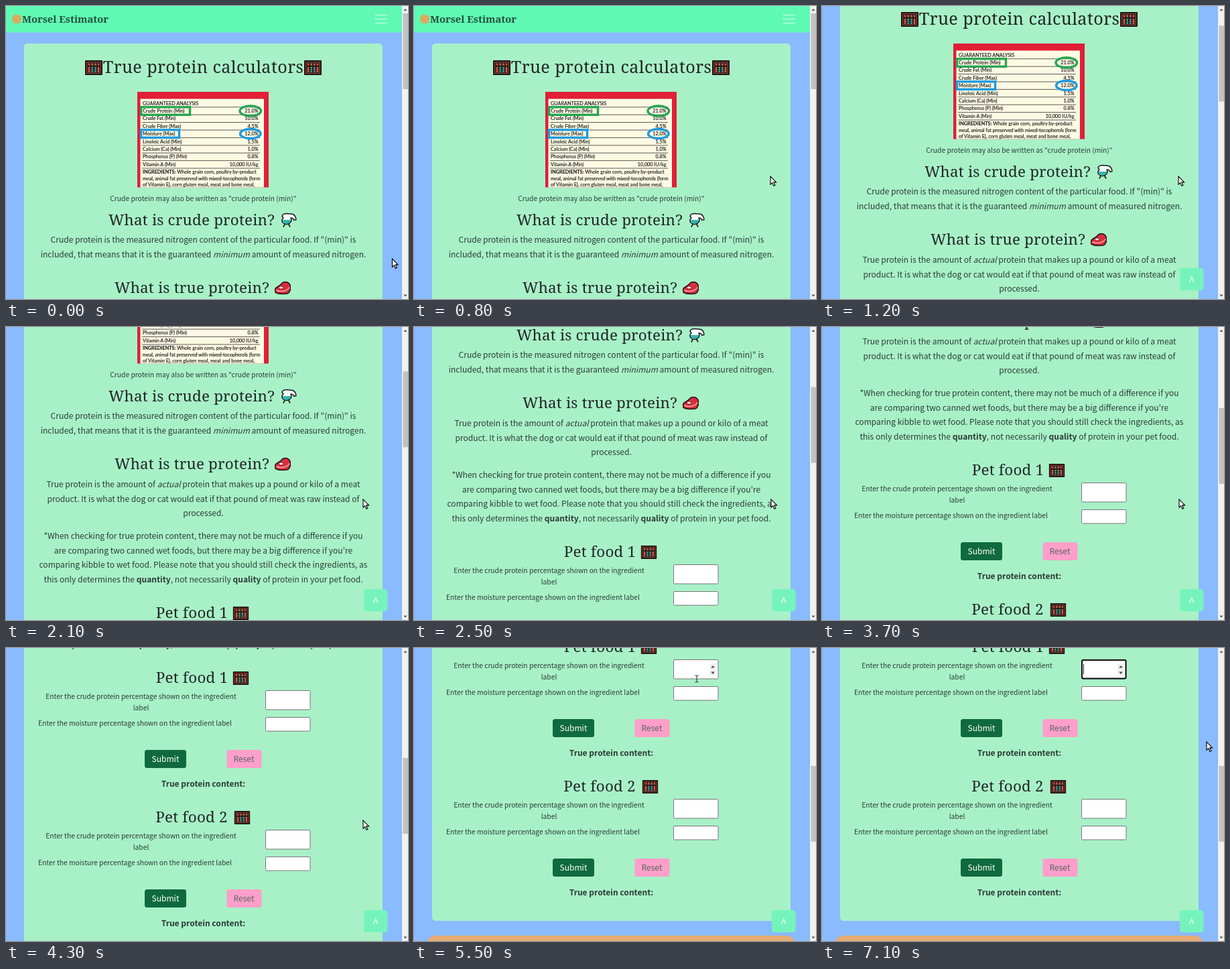
An HTML page that plays this animation: 600x437 px, repeating every 7200 ms.

```html
<!DOCTYPE html>
<html lang="en">
<head>
<meta charset="utf-8">
<title>True protein calculators</title>
<style>
  html, body { margin: 0; width: 100%; height: 100%; overflow: hidden; background: #8abaff; }
  svg { display: block; width: 100%; height: 100%; }
  text { font-family: "Noto Sans CJK JP", "Noto Sans CJK SC", "Noto Sans CJK", "Open Sans", sans-serif; font-size: 12.06px; fill: #2b3b36; text-anchor: middle; }
  .head { font-family: "Noto Serif", serif; font-size: 22.4px; letter-spacing: .2px; fill: #212529; }
  .title { font-size: 25.2px; letter-spacing: .4px; }
  .brand { font-family: "Noto Serif", serif; font-size: 14.7px; font-weight: 600; fill: #23503f; text-anchor: start; }
  .small { font-size: 10.25px; }
  .strong { font-weight: 700; }
  .slant { font-style: italic; }
  .pack text { font-family: Lato, sans-serif; font-size: 7.25px; font-weight: 500; fill: #1d1d1b; stroke: #1d1d1b; stroke-width: .12px; text-anchor: start; }
  .pack .right { text-anchor: end; }
  .pack .mark { fill: none; stroke-width: 3.4; }
  .pack .rule { stroke: #333; stroke-width: .8; }
  .field { fill: #fff; stroke: #767676; }
</style>
</head>
<body>
<svg viewBox="0 0 600 437">
  <defs>
    <symbol id="abacus" viewBox="0 0 26 22">
      <rect width="26" height="22" rx="1" fill="#171414"/>
      <rect x="2.500" y="2.500" width="21" height="17" fill="#2a1f1e" stroke="#a8412f"/>
      <g fill="none" stroke-width="2.500">
        <path d="M6 4.500v3M6 10v8M20 4.500v3M20 10v8" stroke="#e5503f"/>
        <path d="M10.700 4.500v3M15.400 4.500v3" stroke="#c9704a"/>
        <path d="M10.700 10v8M15.400 10v8" stroke="#3fa9a0" stroke-dasharray="2.200 .8"/>
      </g>
    </symbol>
    <symbol id="flask" viewBox="0 0 24 22">
      <path d="M4 21L6.500 16M14 21L11.500 16" stroke="#222" stroke-width="1.800"/>
      <path d="M2 5Q3 1 9 1L18 2Q22.500 4 23 10L20 11Q18.500 7.500 15 7.500 17.500 12 13 15.500 8 18.500 3.500 15 0 11 4 7.500z" fill="#f8fcfb" stroke="#1b1b1b" stroke-width="1.500" stroke-linejoin="round"/>
      <path d="M2.800 10.500H15Q15 14 12 15.300 8 17.300 4.500 14.800 2.600 13 2.800 10.500z" fill="#35b5b2"/>
    </symbol>
    <symbol id="steak" viewBox="0 0 24 20">
      <path d="M1 11.500C2 8 7 8 10 4S19 0 22 4 23.500 14 21 17 5 19 2 17 .5 13.500 1 11.500z" fill="#db2f3e" stroke="#2a1617" stroke-width="1.700"/>
      <path d="M2.500 13.500Q8 16 14 14.500T22 9" fill="none" stroke="#f6a9a6" stroke-width="1.500"/>
      <ellipse cx="9.500" cy="9.500" rx="3.200" ry="2" fill="#fff" stroke="#7a1b23"/>
    </symbol>
    <g id="form">
      <text class="small" x="201.500" y="673.500">Enter the crude protein percentage shown on the ingredient</text>
      <text class="small" x="201.500" y="691">label</text>
      <text class="small" x="192.500" y="713.500">Enter the moisture percentage shown on the ingredient label</text>
      <rect class="field" x="387.500" y="661.500" width="66.500" height="28.500" rx="1.500"/>
      <rect class="field" x="387.500" y="701.500" width="66.500" height="20.500" rx="1.500"/>
      <rect x="207" y="750" width="62" height="27" rx="3.500" fill="#0f6a3f"/>
      <text x="238" y="768" style="fill:#fff">Submit</text>
      <rect x="329.500" y="750" width="52" height="27" rx="3.500" fill="#fd9fc9"/>
      <text x="355" y="768" style="fill:#50665f">Reset</text>
      <text class="strong" x="294.500" y="804.500">True protein content:</text>
    </g>
    <clipPath id="packClip"><rect x="196" y="128" width="196" height="142.500"/></clipPath>
  </defs>

  <rect width="600" height="437" fill="#8abaff"/>
  <g id="page">
    <rect width="591" height="39.500" fill="#60f9b3"/>
    <circle cx="16" cy="19.500" r="7" fill="#dcab62"/>
    <text class="brand" x="24" y="24.500">Morsel Estimator</text>
    <path d="M551 13.500h18M551 19.500h18M551 25.500h18" stroke="#b5fcdc" stroke-width="1.500"/>

    <rect x="27" y="56" width="535" height="995" rx="5" fill="#a8f1c7"/>
    <use href="#abacus" x="118" y="81" width="26" height="22"/>
    <text class="head title" x="294.500" y="100">True protein calculators</text>
    <use href="#abacus" x="445" y="81" width="26" height="22"/>

    <g class="pack" clip-path="url(#packClip)">
      <rect x="196" y="128" width="196" height="143" fill="#e01f35"/>
      <rect x="200.500" y="138.500" width="184.500" height="140" fill="#fdfae4"/>
      <text class="strong" x="204" y="147.500">GUARANTEED ANALYSIS</text>
      <g id="rows"></g>
      <text x="204" y="250"><tspan class="strong">INGREDIENTS:</tspan> Whole grain corn, poultry by-product</text>
      <text x="204" y="259.800" style="letter-spacing:-.08px">meal, animal fat preserved with mixed-tocopherols (form</text>
      <text x="204" y="269.300">of Vitamin E), corn gluten meal, meat and bone meal,</text>
      <g class="mark" stroke="#26a551">
        <rect x="201.500" y="150.800" width="73" height="11.500"/>
        <ellipse cx="364.800" cy="156.500" rx="15.800" ry="7.500"/>
      </g>
      <g class="mark" stroke="#1e9be0">
        <rect x="201.500" y="184.800" width="57" height="11.500"/>
        <ellipse cx="364.800" cy="190.500" rx="15.300" ry="7"/>
      </g>
    </g>
    <text class="small" x="294.500" y="290.500">Crude protein may also be written as "crude protein (min)"</text>

    <text class="head" x="277" y="327">What is crude protein?</text>
    <use href="#flask" x="410" y="308.500" width="24" height="22"/>
    <text x="294.500" y="353">Crude protein is the measured nitrogen content of the particular food. If "(min)" is</text>
    <text x="294.500" y="374.500">included, that means that it is the guaranteed <tspan class="slant">minimum</tspan> amount of measured nitrogen.</text>

    <text class="head" x="277.500" y="428">What is true protein?</text>
    <use href="#steak" x="401" y="410.500" width="24" height="20"/>
    <text x="294.500" y="455">True protein is the amount of <tspan class="slant">actual</tspan> protein that makes up a pound or kilo of a meat</text>
    <text x="294.500" y="476.500">product. It is what the dog or cat would eat if that pound of meat was raw instead of</text>
    <text x="294.500" y="498">processed.</text>
    <text x="294.500" y="532">*When checking for true protein content, there may not be much of a difference if you</text>
    <text x="294.500" y="553.500">are comparing two canned wet foods, but there may be a big difference if you're</text>
    <text x="294.500" y="575">comparing kibble to wet food. Please note that you should still check the ingredients, as</text>
    <text x="294.500" y="596.500">this only determines the <tspan class="strong">quantity</tspan>, not necessarily <tspan class="strong">quality</tspan> of protein in your pet food.</text>

    <text class="head" x="277.500" y="650">Pet food 1</text>
    <use href="#abacus" x="338.500" y="633" width="24" height="20"/>
    <use href="#form"/>
    <text class="head" x="277" y="858">Pet food 2</text>
    <use href="#abacus" x="340.500" y="841" width="24" height="20"/>
    <use href="#form" y="208"/>

    <g id="spinner">
      <rect x="441" y="667" width="10" height="18" fill="#f0f0f0"/>
      <path d="M443.200 673.500h5.600l-2.800-3.500zM443.200 679.500h5.600l-2.800 3.500z" fill="#505050"/>
    </g>
    <rect id="ring" x="388" y="662" width="65.500" height="27.500" rx="2" fill="none" stroke="#101010" stroke-width="2"/>
    <path id="caret" d="M390.500 668v15" stroke="#222"/>
    <rect x="19" y="1073" width="550" height="200" rx="13" fill="#e7ab72"/>
  </g>

  <g id="toTop">
    <rect x="534" y="391" width="35.500" height="33" rx="4" fill="#76f3bd"/>
    <path d="M548.700 411.500l3-7.500 3 7.500" fill="none" stroke="#d2fbe8" stroke-width="1.700"/>
  </g>

  <rect x="591" width="9" height="437" fill="#f1f1f1"/>
  <rect id="thumb" x="592.500" width="7.500" height="113" fill="#c1c1c1"/>
  <path d="M593.500 7h5l-2.500-3zM593.500 430.500h5l-2.500 3z" fill="#505050"/>

  <g id="pointer">
    <path id="arrow" d="M0 0v12.200l2.800-2.600 2.100 4.700 2-.9-2.100-4.500h3.800z" fill="#fff" stroke="#000" stroke-width="1.100"/>
    <path id="beam" d="M-2.500-5Q0-5 0-4 0-5 2.500-5M0-4.500v9M-2.500 5Q0 5 0 4 0 5 2.500 5" fill="none" stroke="#222"/>
  </g>
</svg>
<script>
  const $ = id => document.getElementById(id);
  const LOOP = 7200, STEP = 100;

  const nutrients = [
    ["Crude Protein (Min)", "21.0%"], ["Crude Fat (Min)", "10.0%"],
    ["Crude Fiber (Max)", "4.5%"], ["Moisture (Max)", "12.0%"],
    ["Linoleic Acid (Min)", "1.5%"], ["Calcium (Ca) (Min)", "1.0%"],
    ["Phosphorus (P) (Min)", "0.8%"], ["Vitamin A (Min)", "10,000 IU/kg"]
  ];
  const rule = y => `<path class="rule" d="M203 ${y}H379"/>`;
  $("rows").innerHTML = nutrients.map(([name, amount], i) => {
    const y = 159 + i * 11.4;
    return `${rule(y - 8.2)}<text x="204" y="${y}">${name}</text>
      <text class="right" x="376.500" y="${y}">${amount}</text>`;
  }).join("") + rule(242);

  // Keys are [time, value, ...]; values are joined by straight segments.
  const scrollKeys = [
    [1000, 0], [1200, 72], [1700, 216], [2200, 216],
    [2900, 429], [3800, 429], [4300, 598], [4500, 644]
  ];
  const pointerKeys = [
    [100, 576.5, 377], [800, 532, 254], [1300, 532, 254], [1700, 533, 257],
    [4700, 533, 257], [5300, 422, 46], [5700, 422, 46], [5900, 420, 38],
    [6000, 420, 38], [6500, 574, 140]
  ];

  function sample(keys, t) {
    const next = keys.findIndex(key => key[0] > t);
    if (next === 0) return keys[0].slice(1);
    if (next < 0) return keys[keys.length - 1].slice(1);
    const a = keys[next - 1], b = keys[next];
    const part = (t - a[0]) / (b[0] - a[0]);
    return a.slice(1).map((value, i) => value + (b[i + 1] - value) * part);
  }

  const show = (id, on) => $(id).setAttribute("visibility", on ? "visible" : "hidden");

  function draw() {
    const t = Math.floor(performance.now() % LOOP / STEP) * STEP;
    const scroll = Math.round(sample(scrollKeys, t)[0]);
    const [x, y] = sample(pointerKeys, t);
    const overField = t >= 5300 && t <= 6000;
    const focused = t >= 6000;

    $("page").setAttribute("transform", `translate(0 ${-scroll})`);
    $("thumb").setAttribute("y", 11 + scroll * 0.256);
    $("pointer").setAttribute("transform", `translate(${x} ${y})`);
    show("toTop", scroll > 10);
    show("arrow", !overField);
    show("beam", overField);
    show("spinner", overField || focused);
    show("ring", focused);
    show("caret", focused && (t - 6000) % 1000 < 500);
    requestAnimationFrame(draw);
  }
  draw();
</script>
</body>
</html>
```
